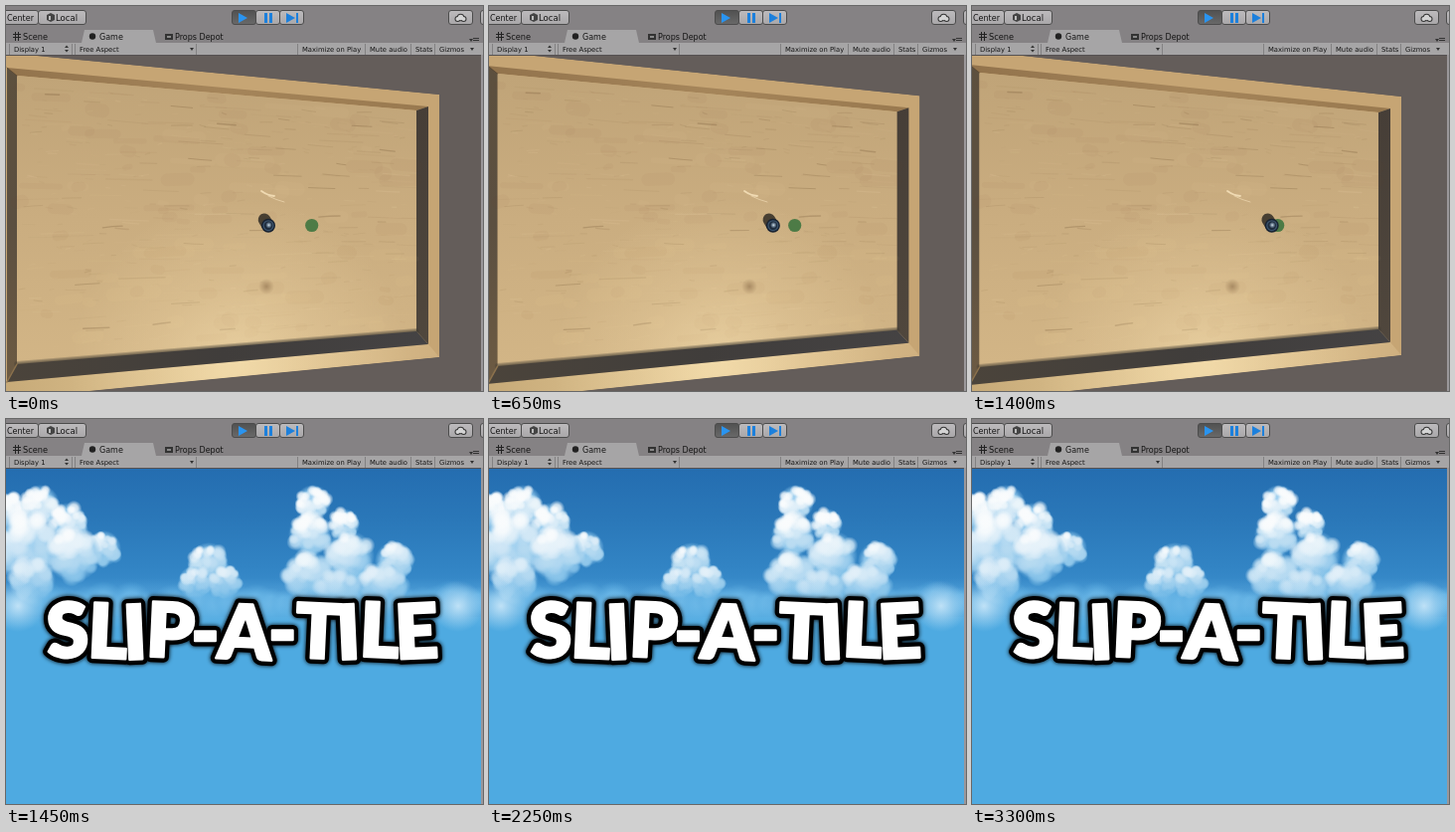
Animation, 480 px wide and 387 px high, one loop 3350 ms. Source, as an HTML page with a canvas:

```html
<!DOCTYPE html>
<html lang="en">
<head>
<meta charset="utf-8">
<title>Game view</title>
<style>
html, body { margin: 0; width: 480px; height: 387px; overflow: hidden; background: #645d5a; }
canvas { display: block; }
</style>
</head>
<body>
<canvas id="stage" width="480" height="387"></canvas>
<script>
const stage = document.getElementById('stage');
let g = stage.getContext('2d');
const LOOP = 3350, STEP = 50, CUT = 1450;
const CONTACT = 1000; // the ball touches the goal and play freezes

let seed = 11;
const rnd = () => (seed = (seed * 16807) % 2147483647) / 2147483647;
const mix = (a, b, k) => a + (b - a) * k;
const clamp = v => Math.max(0, Math.min(1, v));

function rect(x, y, w, h, fill) {
  g.fillStyle = fill;
  g.fillRect(x, y, w, h);
}

function trace(points) {
  g.beginPath();
  points.forEach(p => g.lineTo(...p));
  g.closePath();
}

function poly(points, fill) {
  trace(points);
  g.fillStyle = fill;
  g.fill();
}

function disc(x, y, r, fill) {
  g.beginPath();
  g.arc(x, y, r, 0, 7);
  g.fillStyle = fill;
  g.fill();
}

function line(a, b, width, color, bend = 0) {
  g.beginPath();
  g.moveTo(...a);
  g.quadraticCurveTo((a[0] + b[0]) / 2, (a[1] + b[1]) / 2 + bend, ...b);
  g.lineWidth = width;
  g.strokeStyle = color;
  g.stroke();
}

function stops(grad, colors) {
  colors.forEach((c, i) => grad.addColorStop(i / (colors.length - 1), c));
  return grad;
}
const down = (y, h, ...colors) => stops(g.createLinearGradient(0, y, 0, y + h), colors);
const across = (...colors) => stops(g.createLinearGradient(0, 0, 436, 0), colors);
const glow = (x, y, r, ...colors) => stops(g.createRadialGradient(x, y, 0, x, y, r), colors);

// Paints a still picture once.
function layer(paint) {
  const canvas = document.createElement('canvas'), main = g;
  canvas.width = 480;
  canvas.height = 387;
  g = canvas.getContext('2d');
  paint();
  g = main;
  return canvas;
}

// ---- Board ----

// Corners run clockwise from top left; tilting drifts them by up to 4 px.
const DRIFT = [[-3.5, -3], [-4, 2], [-4, -2], [-3.5, 3]];
const box = (left, right, a, b, c, d) => k =>
  [[left, a], [right, b], [right, c], [left, d]].map((p, i) => p.map((v, j) => v + DRIFT[i][j] * k));
const outer = box(-10, 436, 46, 89, 353, 396);
const rim = box(1, 425, 62, 101, 340, 378);
const floor = box(11, 413, 70, 105, 327, 360);
const inside = (q, u, v) => [0, 1].map(j => mix(mix(q[0][j], q[1][j], u), mix(q[3][j], q[2][j], u), v));

const grain = Array.from({ length: 520 }, (_, i) => {
  const broad = i < 90, knot = i > 490;
  return {
    u: rnd() * .96, v: .02 + rnd() * .94, len: knot ? .02 + .05 * rnd() : .01 + .12 * rnd() ** 3,
    slope: (rnd() - .5) * .012,
    width: broad ? 5 + rnd() * 9 : .4 + rnd() * 1.1,
    alpha: broad ? .035 : knot ? .25 : .03 + .1 * rnd() ** 2,
    tone: !knot && rnd() < .4 ? '240,218,176' : '104,76,44'
  };
});

function drawFloor(f) {
  poly(f, down(70, 290, '#c0a478', '#caad80', '#d2b586'));
  for (const s of grain) {
    const a = inside(f, s.u, s.v), b = inside(f, Math.min(1, s.u + s.len), s.v + s.slope);
    line(a, b, s.width, `rgba(${s.tone},${s.alpha})`, s.slope * 80);
  }
  disc(262, 282, 8, glow(262, 282, 8, 'rgba(110,78,46,.6)', 'rgba(110,78,46,0)'));
  line([257, 186], [270, 191], 1.8, 'rgba(250,230,192,.8)', 2);
  line([264, 191], [280, 197], 1, 'rgba(250,230,192,.55)', 1);
}

function drawBall(x, y) {
  line([x - 4, y - 6], [x - 1, y - 1], 12.5, 'rgba(48,43,36,.85)');
  disc(x, y, 7, '#182231');
  disc(x, y, 5.5, '#3c546d');
  disc(x, y, 4.2, '#1d2a3a');
  disc(x + .5, y - .5, 3.2, glow(x + .5, y - .5, 3.2, '#d4e0e8', '#6d8194', '#243244'));
}

function drawBoard(t) {
  const k = Math.min(t / CONTACT, 1);
  const o = outer(k), r = rim(k), f = floor(k);
  const side = (a, b, i, fill) => poly([a[i], a[(i + 1) % 4], b[(i + 1) % 4], b[i]], fill);
  g.lineCap = 'round';
  rect(0, 49, 480, 338, '#645d5a');

  g.save();
  trace(o);
  g.clip();
  poly(o, '#c6a574');
  side(o, r, 2, across('#c7aa78', '#e4ca98', '#cfb080'));
  side(r, f, 0, across('#92734c', '#a5855a', '#98784e'));
  side(r, f, 1, down(100, 240, '#463e37', '#50473d'));
  side(r, f, 3, down(60, 320, '#5d503e', '#5b4f40', '#6d5b43'));
  drawFloor(f);
  disc(235, 362, 170, glow(235, 362, 170, 'rgba(255,234,186,.5)', 'rgba(255,232,184,.2)', 'rgba(255,232,184,0)'));
  for (let w = 2; w < 8; w += 2) line(f[3], f[2], w, 'rgba(62,56,50,.25)');
  side(r, f, 2, across('#4b443b', '#403d3b', '#454344'));
  line(f[0], r[0], 1, 'rgba(60,44,28,.5)');
  line(f[3], r[3], 1.5, '#8b714c');
  g.restore();

  disc(307.7, 220.5, 6.6, '#4d7b46');
  drawBall(264 + 26 * k + 11.7 * k * k, 220.7);
}

// ---- Title screen ----

// Cloud lobes, back to front: x, y, radius.
const LOBES = [[4, 92, 18], [34, 86, 20], [62, 104, 20], [98, 130, 18], [20, 124, 34], [68, 136, 28], [26, 162, 24],
  [204, 144, 20], [190, 164, 17], [220, 164, 17],
  [309, 84, 18], [340, 106, 16], [306, 116, 22], [391, 143, 20], [345, 138, 26], [304, 158, 26], [378, 170, 26], [335, 176, 26]];

function lobe([x, y, r]) {
  disc(x, y, r, glow(x, y, r, '#a4d2f0', '#a4d2f0', '#8dc5ea', 'rgba(130,190,230,0)'));
  const puffs = Array.from({ length: 46 }, () => {
    const angle = rnd() * 7, reach = Math.sqrt(rnd()) * .8;
    const dx = Math.cos(angle) * reach, dy = Math.sin(angle) * reach;
    return { dx, dy, size: r * mix(.22, .4, rnd()), shade: clamp(.1 + dy * .55 + dx * .15 + (y - 100) / 180 + rnd() * .25) };
  });
  puffs.sort((a, b) => b.shade - a.shade);
  for (const p of puffs) {
    const px = x + p.dx * r, py = y + p.dy * r;
    const rgb = `${mix(250, 105, p.shade)},${mix(252, 180, p.shade)},${mix(253, 228, p.shade)}`;
    disc(px, py, p.size, glow(px, py, p.size, `rgba(${rgb},.9)`, `rgba(${rgb},.75)`, `rgba(${rgb},0)`));
  }
}

const sky = layer(() => {
  rect(0, 49, 480, 338, '#4eaae1');
  rect(0, 49, 480, 150, down(49, 150, '#246db0', '#2a77b8', '#3284c4', '#4296d3'));
  for (let x = 0; x <= 480; x += 14) {
    const r = 14 + rnd() * 10, y = 184 + rnd() * 6;
    disc(x, y, r, glow(x, y, r, '#6cb6e6', '#5fafe3', 'rgba(78,160,216,0)'));
  }
  LOBES.forEach(lobe);
  rect(0, 160, 480, 50, down(160, 50, 'rgba(120,190,234,0)', 'rgba(110,186,232,.5)', '#4eaae1'));
  for (const x of [12, 455]) disc(x, 188, 26, glow(x, 188, 26, 'rgba(220,240,252,.75)', 'rgba(190,224,245,0)'));
});

const title = layer(() => {
  const tight = 2.4, letters = [...'SLIP-A-TILE'];
  g.font = '900 76px Lato, "Open Sans", sans-serif';
  g.lineJoin = 'round';
  g.textAlign = 'center';
  const widths = letters.map(c => g.measureText(c).width - tight);
  const left = 239 - widths.reduce((a, b) => a + b) / 2;
  const each = paint => {
    let x = left;
    letters.forEach((c, i) => {
      g.save();
      g.translate(x + widths[i] / 2, 240.5 + (i % 3 - 1));
      if (c !== '-') g.rotate((i % 2 ? 1 : -1) * .045);
      paint(c);
      g.restore();
      x += widths[i];
    });
  };
  g.shadowColor = '#000';
  g.shadowBlur = 4;
  g.lineWidth = 11;
  each(c => g.strokeText(c, 0, 0));
  g.shadowBlur = 0;
  g.shadowColor = 'transparent';
  g.fillStyle = g.strokeStyle = '#fff';
  g.lineWidth = 2.5;
  each(c => { g.fillText(c, 0, 0); g.strokeText(c, 0, 0); });
});

// ---- Editor bars ----

function button(x, w, dark) {
  g.beginPath();
  g.roundRect(x + .5, 4.5, w, 14, 2.5);
  g.fillStyle = dark ? down(4, 15, '#505050', '#6a6a6a') : down(4, 15, '#bebcbe', '#a8a6a8');
  g.fill();
  g.strokeStyle = '#4c4c4c';
  g.stroke();
}

function label(text, x, y, size) {
  g.font = size + 'px "DejaVu Sans", sans-serif';
  g.fillStyle = '#151515';
  g.fillText(text, x, y);
}

const arrow = (x, size, fill) => poly([[x, 12 - size], [x + size * 1.8, 12], [x, 12 + size]], fill);
const caret = (x, y, h = 3) => poly([[x, y], [x + 4, y], [x + 2, y + h]], '#333');

const bars = layer(() => {
  rect(0, 0, 480, 37, '#858284');
  rect(0, 37, 480, 12, '#a6a5a6');
  rect(0, 49, 480, 1, '#555152');
  rect(478, 49, 2, 338, '#9a979a');
  poly([[76, 37], [79, 24], [148, 24], [151, 37]], '#a6a5a6');

  button(-5, 37);
  button(32, 48);
  label('Center', 1, 15, 8);
  label('Local', 50, 15, 8.5);
  poly([[41, 9], [45, 7], [49, 9], [49, 14], [45, 16], [41, 14]], '#444');
  rect(43, 10, 2, 4, '#bbb');

  button(227, 24, true);
  button(251, 24);
  button(275, 24);
  const blue = '#1c80dc';
  arrow(234, 5, '#2a94f0');
  rect(260, 7, 3, 10, blue);
  rect(265, 7, 3, 10, blue);
  arrow(282, 5, blue);
  rect(292, 7, 2, 10, blue);

  button(445, 24);
  button(477, 20);
  for (const [grow, fill] of [[1, '#333'], [0, '#d4d4d4']])
    for (const dx of [-3, 0, 3]) disc(457.5 + dx, 13 - (dx ? 0 : 1.5), (dx ? 2 : 2.8) + grow, fill);

  for (const d of [0, 3]) {
    rect(9 + d, 26, 1, 9, '#222');
    rect(7, 28 + d, 8, 1, '#222');
  }
  label('Scene', 17, 34, 8.2);
  disc(87, 30.5, 3.2, '#222');
  label('Game', 94, 34, 8);
  rect(160, 28, 8, 6, '#333');
  rect(162, 30, 4, 2, '#888');
  label('Props Depot', 170, 34, 8);

  const tools = { 'Display 1': 8, 'Free Aspect': 74, 'Maximize on Play': 298, 'Mute audio': 366, 'Stats': 412, 'Gizmos': 436 };
  for (const [text, x] of Object.entries(tools)) {
    rect(x - 5, 38, 1, 11, '#828182');
    label(text, x, 46, 6.8);
  }
  rect(66, 38, 1, 11, '#828182');
  rect(191, 38, 1, 11, '#828182');
  caret(185, 42);
  caret(467, 42);
  caret(466, 33);
  caret(59, 42, -2.5);
  caret(59, 44, 2.5);
  rect(470, 32, 6, 1, '#333');
  rect(470, 34, 6, 1, '#333');
});

function frame(now) {
  const t = Math.floor((now % LOOP) / STEP) * STEP;
  if (t < CUT) {
    drawBoard(t);
  } else {
    g.drawImage(sky, 0, 0);
    g.drawImage(title, 0, 0);
  }
  g.drawImage(bars, 0, 0);
  requestAnimationFrame(frame);
}
requestAnimationFrame(frame);
</script>
</body>
</html>
```
